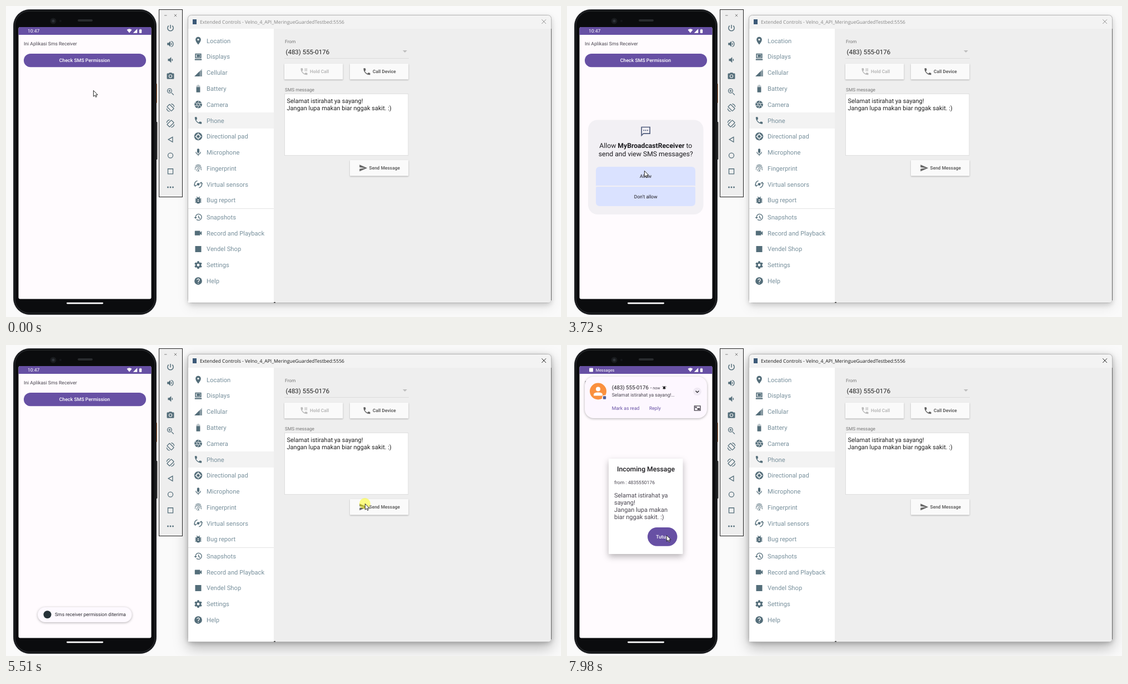
An HTML page that plays this animation: 999x561 px, repeating every 8000 ms.

```html
<!DOCTYPE html>
<html lang="en">
<head>
<meta charset="utf-8">
<title>SMS receiver demo</title>
<style>
html, body { margin: 0; width: 100%; height: 100%; overflow: hidden; background: #fafafa; }
svg { display: block; width: 999px; height: 561px; font-family: Roboto, sans-serif; text-rendering: geometricPrecision; }
.line { fill: none; stroke: currentColor; stroke-width: 2; }
.title { font-family: "Open Sans", sans-serif; fill: #858585; }
.close { stroke: #929292; }
.active .title { fill: #161616; }
.active .close { stroke: #222; }
.window { filter: drop-shadow(0 3px 5px rgba(0,0,0,.15)) drop-shadow(0 8px 9px rgba(0,0,0,.08)); }
.active .window { filter: drop-shadow(0 2px 4px rgba(0,0,0,.2)) drop-shadow(0 10px 12px rgba(0,0,0,.26)); }
.button { filter: drop-shadow(0 1px 1px rgba(0,0,0,.28)); }
.card { filter: drop-shadow(0 1px 2px rgba(0,0,0,.3)); }
.popup { filter: drop-shadow(0 5px 6px rgba(0,0,0,.28)); }
</style>
</head>
<body>
<svg id="stage" viewBox="0 0 999 561" xmlns="http://www.w3.org/2000/svg"></svg>
<script>
const LOOP = 8000;
const PURPLE = '#6750a4', SLATE = '#546e7a', LABEL = '#78909c', GREY = '#757575', INK = '#1c1b1f';
const NUMBER = '(483) 555-0176';

const text = (x, y, str, size, fill, more = '') =>
  `<text x="${x}" y="${y}" font-size="${size}" fill="${fill}" ${more}>${str}</text>`;
const mid = (x, y, str, size, fill, weight = 400) =>
  text(x, y, str, size, fill, `text-anchor="middle" font-weight="${weight}"`);
const box = (x, y, w, h, fill, r = 0, more = '') =>
  `<rect x="${x}" y="${y}" width="${w}" height="${h}" rx="${r}" fill="${fill}" ${more}/>`;
const dot = (x, y, r, fill = 'currentColor') => `<circle cx="${x}" cy="${y}" r="${r}" fill="${fill}"/>`;
const path = (d, more = '') => `<path d="${d}" ${more}/>`;
const line = (d, width = 2, more = '') => path(d, `class="line" style="stroke-width:${width}" ${more}`);
const spin = (n, draw) => Array.from({ length: n }, (_, i) =>
  `<g transform="rotate(${i * 360 / n} 12 12)">${draw}</g>`).join('');

const HANDSET = 'M6.6 10.8c1.4 2.8 3.8 5.1 6.6 6.6l2.2-2.2c.3-.3.7-.4 1-.2 1.1.4 2.3.6 3.6.6.6 0 1 .4 1 1V20c0 .6-.4 1-1 1C10.600 21 3 13.400 3 4c0-.6.4-1 1-1h3.500c.6 0 1 .4 1 1 0 1.200.2 2.400.6 3.600.1.3 0 .7-.3 1z';
const SPEAKER = 'v6h4l5 5V4L7 9z';

// Every icon is drawn on a 24 unit grid.
const ICONS = {
  pin: path('M12 2C8.100 2 5 5.100 5 9c0 5.250 7 13 7 13s7-7.750 7-13c0-3.900-3.100-7-7-7zm0 9.500a2.500 2.500 0 0 1 0-5 2.500 2.500 0 0 1 0 5z'),
  display: line('M5 5h14v10H5z', 2.400) + path('M3 18h18v3H3zM8 7h9v6H8z'),
  signal: path('M2 22h20V2z', 'opacity=".45"') + path('M2 22h14V8z') + path('M17 7h5v15h-5z', 'opacity=".5"'),
  battery: path('M10 2h4v2h2q1 0 1 1v3H7V5q0-1 1-1h2z', 'opacity=".4"') + path('M7 8h10v13q0 1-1 1H8q-1 0-1-1z'),
  aperture: dot(12, 12, 10) + spin(6, path('M9 11L14.500 1.500', 'stroke="#fff" stroke-width="1.200"')),
  phone: path(HANDSET),
  hold: path(HANDSET) + path('M14 3h2v8h-2zM18 3h2v8h-2z'),
  dpad: dot(12, 12, 10.500) + '<circle cx="12" cy="12" r="4.800" fill="none" stroke="#fff" stroke-width="2"/>' +
    spin(4, path('M10 5.500L12 3l2 2.500z', 'fill="#fff"')),
  mic: path('M9 5a3 3 0 0 1 6 0v6a3 3 0 0 1-6 0z') + line('M6 11a6 6 0 0 0 12 0M12 17v4'),
  finger: line('M5 5q7-5 14 0M3 10q9-10 18 0M4 16q-1-8 8-8t8 9M7 19q2-8 5-8 5 0 5 4M10 21q3-4 2-7M14 21q-2-2 0-6', 1.300),
  sensors: dot(12, 12, 3.500) + line('M4 17A9 9 0 0 1 10 3M20 7A9 9 0 0 1 14 21M1 13l3 4 4-3M23 11l-3-4-4 3'),
  bug: box(6, 5, 12, 16, 'currentColor', 6) + line('M4 9h16M4 13h16M4 17h16M8 3l3 3M16 3l-3 3') +
    path('M10 10h4v2h-4zM10 14h4v2h-4z', 'fill="#fff"'),
  history: line('M5 12a8 8 0 1 1 2.500 5.700M13 8v5l4 2.500') + path('M1 12h8l-4 4z'),
  video: path('M4 6h12q1 0 1 1v3.500l4-4v11l-4-4V17q0 1-1 1H4q-1 0-1-1V7q0-1 1-1z'),
  square: box(4, 4, 16, 16, 'currentColor'),
  gear: spin(6, box(9.500, 2, 5, 6, 'currentColor', 1)) + '<circle cx="12" cy="12" r="5.500" class="line" style="stroke-width:4"/>',
  help: dot(12, 12, 10) + path('M9 9.500a3 3 0 1 1 5 2.200q-2 1.300-2 3.300M12 17v2', 'fill="none" stroke="#fff" stroke-width="2"'),
  power: line('M12 3v10M7 5.500a8 8 0 1 0 10 0', 2.300),
  loud: path('M3 9' + SPEAKER) + path('M14 8v8q2.500-1.300 2.500-4T14 8z') + line('M14 4.300a8 8 0 0 1 0 15.400'),
  quiet: `<g transform="translate(2 0)">${path('M3 9' + SPEAKER)}${path('M14 8v8q2.500-1.300 2.500-4T14 8z')}</g>`,
  photo: path('M9 3h6l2 2h3q2 0 2 2v12q0 2-2 2H4q-2 0-2-2V7q0-2 2-2h3z') + dot(12, 13, 5, '#eee') + dot(12, 13, 3.200),
  zoom: line('M15 15l6 6M6.500 9.500h6M9.500 6.500v6') + '<circle cx="9.500" cy="9.500" r="6" class="line"/>',
  turn: '<rect x="7" y="3.500" width="10" height="17" rx="1" class="line" transform="rotate(-45 12 12)"/>' +
    line('M14 1.500q7 1 8.500 8M10 22.500q-7-1-8.500-8'),
  back: line('M18 5v14L6 12z'),
  home: '<circle cx="12" cy="12" r="7" class="line"/>',
  recent: line('M5 5h14v14H5z'),
  more: dot(5, 12, 2.200) + dot(12, 12, 2.200) + dot(19, 12, 2.200),
  send: path('M2 21l21-9L2 3v7l15 2-15 2z'),
  sms: line('M3 21V3h18v14H7z') + dot(8, 10, 1.300) + dot(12, 10, 1.300) + dot(16, 10, 1.300),
  wifi: path('M12 21L0 6.500Q12-2.500 24 6.500z'),
  bars: path('M2 22h20V2z'),
  bell: path('M4 19v-2l2-2v-5q0-5 6-6 6 1 6 6v5l2 2v2zM10 20h4q-2 4-4 0z') + line('M2 9q0-4 4-6M22 9q0-4-4-6'),
  chevron: line('M5 9l7 7 7-7', 3),
  bubble: line('M3 5h18v14H3z', 2.400) + path('M12 12h7v5h-7z') + line('M6 8l5 4M6 12V8h4', 1.800)
};
const icon = (name, x, y, size, color = SLATE) =>
  `<g transform="translate(${x - size / 2} ${y - size / 2}) scale(${size / 24})" color="${color}" fill="${color}">${ICONS[name]}</g>`;

const phone = () =>
  box(268, 140, 4, 35, '#a35f35', 1) + box(268, 209, 4.500, 68, '#222', 1) +
  box(13.500, 6.500, 257, 550, '#0b0c0e', 29, 'stroke="#34363a" stroke-width="1"') +
  box(16, 9, 252, 545, 'none', 26, 'stroke="#25272a" stroke-width="1.500"') +
  dot(85, 27, 5.500, '#191b1e') + dot(85, 27, 2.500, '#30343a') + dot(98, 27, 2, '#15171a') +
  box(129, 24, 27, 4, '#292b2e', 2) +
  box(22.500, 38, 239, 490.500, '#fffbfe', 3) +
  path('M22.500 52V41q0-3 3-3h233q3 0 3 3v11z', `fill="${PURPLE}"`) +
  `<g id="clock">${text(39, 48.300, '10:47', 8.600, '#fff')}</g>` +
  icon('wifi', 222, 45, 9, '#fff') + icon('bars', 232.500, 45, 9, '#fff') + icon('battery', 242, 45, 9, '#fff') +
  box(239.800, 42.500, 4.400, 6, '#fff', .5) +
  box(109, 534.800, 66, 2.600, '#fff', 1.300) +
  text(32, 71.200, 'Ini Aplikasi Sms Receiver', 8.650, '#49454f') +
  box(32, 86, 220, 24.300, PURPLE, 12.150) +
  mid(141.500, 101.400, 'Check SMS Permission', 8.750, '#fff', 500);

const toolbar = () => {
  const names = ['power', 'loud', 'quiet', 'photo', 'zoom', 'turn', 'turn', 'back', 'home', 'recent', 'more'];
  return box(275.500, 6.500, 42, 338, '#eeeeee', 0, 'stroke="#222"') +
    path('M285 17h4.500M302.800 14.800l4.400 4.400M307.200 14.800l-4.400 4.400', `stroke="${GREY}" stroke-width=".9"`) +
    names.map((n, i) => {
      const y = 39.800 + i * 28.720;
      const art = icon(n, 296, y, 15.500);
      return i === 6 ? `<g transform="translate(592 0) scale(-1 1)">${art}</g>` : art;
    }).join('');
};

const menu = () => {
  const rows = [
    ['pin', 'Location'], ['display', 'Displays'], ['signal', 'Cellular'], ['battery', 'Battery'],
    ['aperture', 'Camera'], ['phone', 'Phone'], ['dpad', 'Directional pad'], ['mic', 'Microphone'],
    ['finger', 'Fingerprint'], ['sensors', 'Virtual sensors'], ['bug', 'Bug report'], ['history', 'Snapshots'],
    ['video', 'Record and Playback'], ['square', 'Vendel Shop'], ['gear', 'Settings'], ['help', 'Help']
  ];
  return box(328, 41, 154, 494, '#fff') + box(328, 192, 154, 29, '#f3f3f3') + box(328, 365, 154, 1, '#e4e4e4') +
    rows.map(([n, label], i) => {
      const y = 62.700 + i * 28.760 + (i > 10 ? 1.900 : 0);
      return icon(n, 346, y, 16.500) + text(361, y + 4, label, 11.200, LABEL);
    }).join('');
};

const button = (x, y, name, label, tx, color) =>
  box(x, y, 105.500, 28.500, '#fafafa', 1, 'class="button"') +
  icon(name, tx - 10.500, y + 14.300, 16, color) + text(tx, y + 17.400, label, 8.400, color, 'font-weight="700"');

const controls = () =>
  box(327.500, 16.500, 654, 519, '#f3f3f3', 6, 'class="window" stroke="#b4b4b4"') +
  path('M482 41h499v489q0 5-5 5H482z', 'fill="#eeeeee"') +
  path('M981.500 41v490', 'stroke="#666"') + box(482, 534, 3, 1.500, '#444') +
  box(336, 24, 7, 9, '#3c5a78') +
  text(349, 31.700, 'Extended Controls - Velno_4_API_MeringueGuardedTestbed:5556', 8.620, '', 'class="title"') +
  path('M964.300 24.300l7.700 7.700M972 24.300l-7.700 7.700', 'class="close" stroke-width="1"') +
  menu() +
  text(502, 66.500, 'From', 8.300, GREY) + text(503.500, 86.700, NUMBER, 11.500, '#212121') +
  path('M714 80h8l-4 4z', 'fill="#bdbdbd"') + box(501, 94, 224, 1, '#dcdcdc') +
  button(501, 104, 'hold', 'Hold Call', 547, '#b9b9b9') +
  button(619, 104, 'phone', 'Call Device', 660, '#616161') +
  text(502, 154.300, 'SMS message', 8.300, GREY) +
  box(501.500, 158.500, 222.500, 111, '#fff', 0, 'stroke="#dedede"') +
  text(505.500, 174.700, 'Selamat istirahat ya sayang!', 11, '#212121') +
  text(505.500, 187.500, 'Jangan lupa makan biar nggak sakit. :)', 11, '#212121') +
  button(619, 278, 'send', 'Send Message', 653.500, '#666');

const ask = () =>
  box(38, 205.500, 207.500, 170.500, '#f2f0f4', 17) + icon('sms', 141.700, 226, 20, '#505c7c') +
  mid(141.800, 256.200, 'Allow <tspan font-weight="700">MyBroadcastReceiver</tspan> to', 12.200, INK) +
  mid(141.800, 270.700, 'send and view SMS messages?', 12.200, INK) +
  path('M52 325v-28q0-7 7-7h165q7 0 7 7v28q0-1-2-1H54q-2 0-2 1z', 'fill="#dae2ff"') +
  path('M52 328q0-2 2-2h175q2 0 2 2v26q0 7-7 7H59q-7 0-7-7z', 'fill="#dae2ff"') +
  mid(141.700, 310.300, 'Allow', 8.600, INK) + mid(141.700, 347, 'Don’t allow', 8.600, INK);

const toast = () =>
  box(57, 473, 169.500, 27, '#fdf9ff', 13.500, 'class="card"') + dot(74.500, 486.300, 7, '#263238') +
  text(88, 489.300, 'Sms receiver permission diterima', 8.600, '#2b2930');

const popup = () =>
  box(75, 205, 133.500, 172, '#fff', 1, 'class="popup"') +
  mid(142, 228.300, 'Incoming Message', 12.200, INK, 500) +
  text(85, 250.700, 'from : ' + NUMBER.replace(/\D/g, ''), 8.650, '#49454f') +
  ['Selamat istirahat ya', 'sayang!', 'Jangan lupa makan', 'biar nggak sakit. :)']
    .map((s, i) => text(85, 275 + i * 12.900, s, 11, '#49454f')).join('') +
  box(145, 329, 53.500, 33.800, PURPLE, 16.900) + mid(171.500, 349.200, 'Tutup', 8.700, '#fff', 500);

const notice = () =>
  box(40, 41.500, 7, 7, '#fff', 1) + text(51.500, 48, 'Messages', 7.400, '#fff') +
  box(32, 57, 220, 75, '#fdf7ff', 16, 'class="card"') +
  dot(56, 83.500, 15, '#fa903e') + dot(56, 79.500, 4, '#fff') + path('M48 91.500v-2q0-4 8-4t8 4v2z', 'fill="#fff"') +
  dot(67.500, 95, 4.500, '#fdf7ff') + box(64.800, 92.300, 5.400, 5.400, '#53629a', 1) +
  text(80.700, 80.200, NUMBER, 9.700, INK) + text(150, 79.700, '• now', 7.200, '#49454f') +
  icon('bell', 175, 77, 8, INK) +
  text(80.700, 93, 'Selamat istirahat ya sayang!…', 8.600, '#49454f') +
  text(80.700, 117, 'Mark as read', 8.600, PURPLE) + text(148, 117, 'Reply', 8.600, PURPLE) +
  dot(234.500, 84, 7.300, '#f0eaf4') + icon('chevron', 234.500, 84, 10, INK) + icon('bubble', 234.700, 114, 14, '#49454f');

// Overlay name -> visible from, to.
const SHOW = { ask: [2410, 3920], toast: [4320, 6560], popup: [7240, LOOP], notice: [7770, LOOP] };
const LAYERS = { ask, toast, popup, notice };
const FOCUS = 5500;
const CLICKS = [[1220, 1290], [3650, 3720], [5500, 5570]];

// Pointer moves: first step, last step, number of steps, end point.
const START = [157, 152];
const MOVES = [
  [690, 1157, 8, 130, 98], [2880, 2950, 2, 142, 227], [3180, 3460, 5, 139, 297],
  [4390, 4650, 4, 502, 286], [4920, 4920, 1, 573, 280], [4990, 5350, 6, 646, 286], [7770, 7980, 4, 179, 343]
];

const stage = document.getElementById('stage');
stage.innerHTML = box(0, 0, 999, 561, '#fafafa') + controls() + phone() + toolbar() +
  Object.entries(LAYERS).map(([id, draw]) => `<g id="${id}">${draw()}</g>`).join('') +
  `<g id="pointer"><circle id="ring" r="10" fill="#ff0" fill-opacity=".47"/>` +
  path('M.4.400v10.800l2.500-2.300 1.700 3.500 1.700-.8-1.600-3.400h3.300z', 'fill="#fff" stroke="#111" stroke-width=".9"') + '</g>';
const $ = id => document.getElementById(id);
const show = (id, on) => { $(id).style.display = on ? '' : 'none'; };
const within = (t, [from, to]) => t >= from && t < to;

function pointerAt(t) {
  let [x, y] = START;
  for (const [from, to, steps, nx, ny] of MOVES) {
    if (t < from) break;
    const gap = steps > 1 ? (to - from) / (steps - 1) : 1;
    const p = Math.min(steps, Math.floor((t - from) / gap + 1e-6) + 1) / steps;
    const k = p * (2 - p);
    x += (nx - x) * k;
    y += (ny - y) * k;
  }
  return [x, y];
}

function render(t) {
  for (const id in SHOW) show(id, within(t, SHOW[id]));
  show('clock', t < SHOW.notice[0]);
  show('ring', CLICKS.some(c => within(t, c)));
  stage.classList.toggle('active', t >= FOCUS);
  $('pointer').setAttribute('transform', `translate(${pointerAt(t)})`);
}

const began = performance.now();
function tick() {
  render((performance.now() - began) % LOOP);
  requestAnimationFrame(tick);
}
tick();
</script>
</body>
</html>
```
